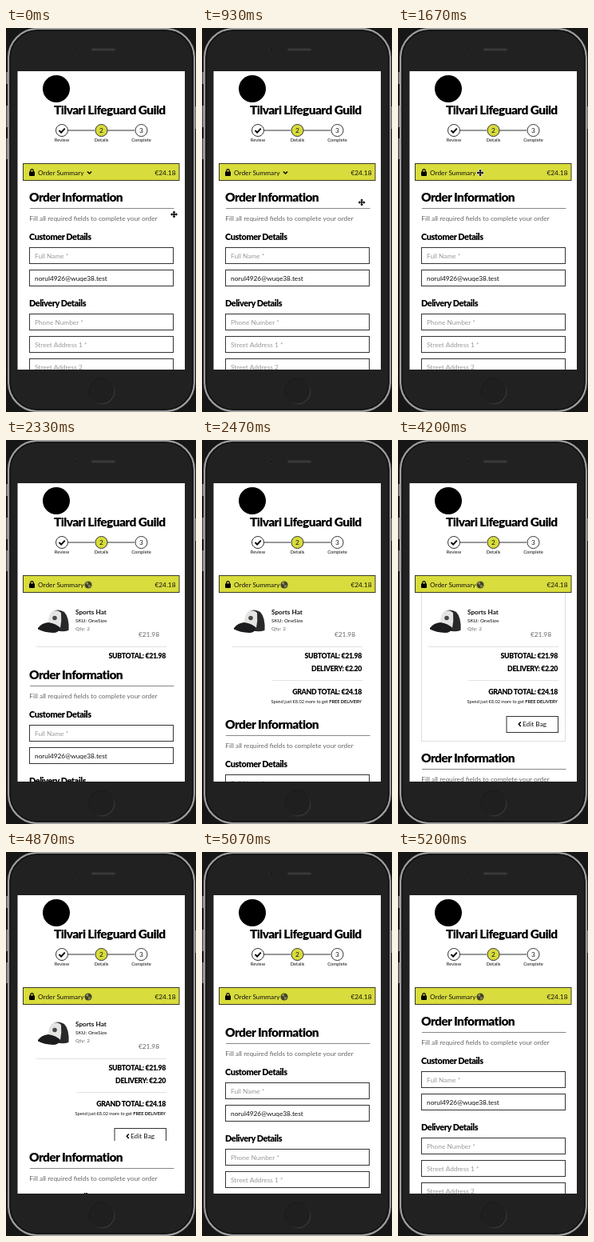
These frames come from a looping animation (238x480 px, 5390 ms). An HTML page:

```html
<!DOCTYPE html>
<html lang="en">
<head>
<meta charset="utf-8">
<title>Checkout order summary</title>
<style>
  html, body { margin: 0; width: 100%; height: 100%; overflow: hidden; background: #161617; }
  svg { display: block; width: 238px; height: 480px; }
  text { font: 8.3px Lato, sans-serif; fill: #111; }
  .head { font-weight: 900; letter-spacing: -.04em; fill: #000; }
  .h1 { font-size: 15.5px; }
  .h2 { font-size: 10.9px; }
  .sum { font-size: 8.8px; }
  .label { font-size: 5.8px; }
  .small { font-size: 6.5px; }
  .note { font-size: 5.6px; }
  .bold { font-weight: 700; }
  .soft { fill: #666; }
  .hint { fill: #999; }
  .mid { text-anchor: middle; }
  .end { text-anchor: end; }
  .box { fill: #fff; stroke: #333; }
  .rule { stroke: #e2e2e2; }
</style>
</head>
<body>
<svg viewBox="0 0 238 480">
  <defs>
    <clipPath id="screen"><rect x="14.500" y="54" width="209.500" height="373"/></clipPath>
    <clipPath id="fold"><rect id="foldBox" x="22" y="191" width="196" height="0"/></clipPath>
    <linearGradient id="ring" x2="1" y2="1">
      <stop offset=".3" stop-color="#19191a"/>
      <stop offset=".6" stop-color="#262627"/>
      <stop offset="1" stop-color="#59595b"/>
    </linearGradient>
  </defs>

  <!-- phone -->
  <rect width="238" height="480" fill="#161617"/>
  <path d="M1.500 55v15M1.500 97v27M1.500 138v26M236.800 98v28" stroke="#8a8a8c" stroke-width="2"/>
  <rect x="3.200" y="1" width="232.600" height="478" rx="36" fill="#212122" stroke="#9c9c9e" stroke-width="2.400"/>
  <rect x="5.200" y="3" width="228.600" height="474" rx="34" fill="none" stroke="#111112" stroke-width="1.500"/>
  <circle cx="87" cy="27" r="2" fill="#141416" stroke="#2b2b2f"/>
  <rect x="107" y="25.500" width="30" height="3" rx="1.500" fill="#39393b"/>
  <circle cx="120" cy="454" r="16" fill="#1f1f20" stroke="url(#ring)"/>

  <g clip-path="url(#screen)">
    <rect x="14" y="54" width="211" height="373" fill="#fff"/>
    <circle cx="63" cy="76" r="17"/>
    <text class="head h1" x="60" y="108">Tilvari Lifeguard Guild</text>

    <!-- progress -->
    <path d="M78 128H111M127 128H161" stroke="#333"/>
    <g class="box">
      <circle cx="70" cy="128" r="7.500"/>
      <circle cx="119.500" cy="128" r="7.500" fill="#d8dc3c"/>
      <circle cx="169.500" cy="128" r="7.500"/>
    </g>
    <path d="M66.500 128l2.600 2.600 4.700-5" fill="none" stroke="#000" stroke-width="2"/>
    <text class="mid" x="119.500" y="130.500">2</text>
    <text class="mid" x="169.500" y="130.500">3</text>
    <text class="label mid" x="70" y="142">Review</text>
    <text class="label mid" x="119.500" y="142">Details</text>
    <text class="label mid" x="169.500" y="142">Complete</text>

    <!-- form, pushed down by the summary -->
    <g id="form">
      <text class="head h1" x="29" y="217">Order Information</text>
      <path d="M30 225.500H210.500" stroke="#888"/>
      <text class="soft" x="29.300" y="241">Fill all required fields to complete your order</text>
      <text class="head h2" x="29" y="265">Customer Details</text>
      <text class="head h2" x="29" y="348">Delivery Details</text>
      <g id="fields"></g>
    </g>

    <!-- summary -->
    <g clip-path="url(#fold)">
      <rect id="edge" x="29.500" y="190.500" width="180" height="186" fill="none" stroke="#ddd"/>
      <path d="M57 216Q64 209.500 73 215Q79.500 222 78.500 238Q69 241 60 237Z" fill="#29292b"/>
      <path d="M53 229Q53 218 58 214.500Q65 211.500 69 216Q70 226 68 235Q60 230 53 229Z" fill="#e4e4e2"/>
      <circle cx="61" cy="222.500" r="2.800" fill="#48484a"/>
      <path d="M40 235Q45 228.500 53 228Q63 229.500 68 235Q66 241 59 241Q48 240.500 40 236.500Z" fill="#1c1c1e"/>
      <text class="bold" x="87" y="218" style="font-size:8.2px">Sports Hat</text>
      <text class="small" x="87" y="228">SKU: OneSize</text>
      <text class="small soft" x="87" y="237.500">Qty: 2</text>
      <text class="end soft" x="192" y="245.500">€21.98</text>
      <path class="rule" d="M38 258.500H201M88 300.500H201"/>
      <text class="head sum end" x="200" y="272.500">SUBTOTAL: €21.98</text>
      <text class="head sum end" x="200" y="289">DELIVERY: €2.20</text>
      <text class="head sum end" x="200" y="318">GRAND TOTAL: €24.18</text>
      <text class="note end" x="200" y="329">Spend just €8.02 more to get <tspan class="bold">FREE DELIVERY</tspan></text>
      <rect class="box" x="136" y="345.500" width="64.500" height="20"/>
      <path d="M153.800 352.500l-2.500 2.800 2.500 2.800" fill="none" stroke="#000" stroke-width="1.500"/>
      <text x="156" y="358">Edit Bag</text>
    </g>

    <rect x="21.500" y="169.500" width="195.500" height="21" fill="#d8dc3c" stroke="#3a3a24"/>
    <path d="M29 179.500H36V184Q36 185 35 185H30Q29 185 29 184Z"/>
    <path d="M30.700 180v-1.500a1.800 1.800 0 0 1 3.600 0v1.500" fill="none" stroke="#000" stroke-width="1.200"/>
    <text x="40" y="183.500">Order Summary</text>
    <path id="chevron" d="M102 179.500l2.500 2.500 2.500-2.500" fill="none" stroke="#000" stroke-width="1.500"/>
    <text class="end" x="212.500" y="183.500">€24.18</text>

    <!-- pointers -->
    <g id="move">
      <path d="M0-4.500l2 2.200H.7V-.7H2.300V-2L4.500 0 2.300 2V.7H.7V2.300H2L0 4.500-2 2.300H-.7V.7H-2.300V2L-4.500 0-2.300-2V-.7H-.7V-2.300H-2Z"
        stroke="#fff" stroke-width="1.200" paint-order="stroke"/>
    </g>
    <g id="busy" transform="translate(103 181)">
      <circle r="4.600" fill="#44442c"/>
      <path d="M0 0L-3.500-1.500A3.800 3.800 0 0 1 0-3.800ZM0 0L3.600 1A3.800 3.800 0 0 1 .5 3.700Z" fill="#8d8e58"/>
    </g>
  </g>
</svg>
<script>
  const LOOP = 5390, STEP = 1000 / 15, FULL = 186;
  const $ = id => document.getElementById(id);

  const fields = [
    [275, "Full Name *", "hint"],
    [303, "norul4926@wuqe38.test", ""],
    [358, "Phone Number *", "hint"],
    [386, "Street Address 1 *", "hint"],
    [414, "Street Address 2", "hint"]
  ];
  $("fields").innerHTML = fields.map(([y, label, tone]) =>
    `<rect class="box" x="29.5" y="${y - .5}" width="180" height="20"/>
     <text class="${tone}" x="36" y="${y + 12.5}">${label}</text>`).join("");

  const progress = (t, start, length) => Math.min(1, Math.max(0, (t - start) / length));
  const swing = p => .5 - Math.cos(Math.PI * p) / 2;

  // Curved pointer path from rest to the summary bar
  function pointer(t) {
    const p = swing(progress(t, 665, 1000)), q = 1 - p;
    const bend = (a, b, c) => q * q * a + 2 * p * q * b + p * p * c;
    return [bend(210.5, 184, 103), bend(233, 184, 181)];
  }

  function draw(now) {
    const t = Math.floor((now % LOOP + 4) / STEP) * STEP;
    const shift = Math.round(FULL * (swing(progress(t, 2057, 600)) - swing(progress(t, 4807, 316))));
    const waiting = t >= 1860;
    const [x, y] = pointer(t);
    $("foldBox").setAttribute("height", shift);
    $("form").setAttribute("transform", `translate(0 ${shift})`);
    $("edge").style.display = shift === FULL ? "" : "none";
    $("move").setAttribute("transform", `translate(${x} ${y})`);
    $("move").style.display = waiting ? "none" : "";
    $("busy").style.display = waiting ? "" : "none";
    $("chevron").style.display = t >= 1660 ? "none" : "";
  }

  const begin = performance.now();
  function tick() {
    draw(performance.now() - begin);
    requestAnimationFrame(tick);
  }
  tick();
</script>
</body>
</html>
```
